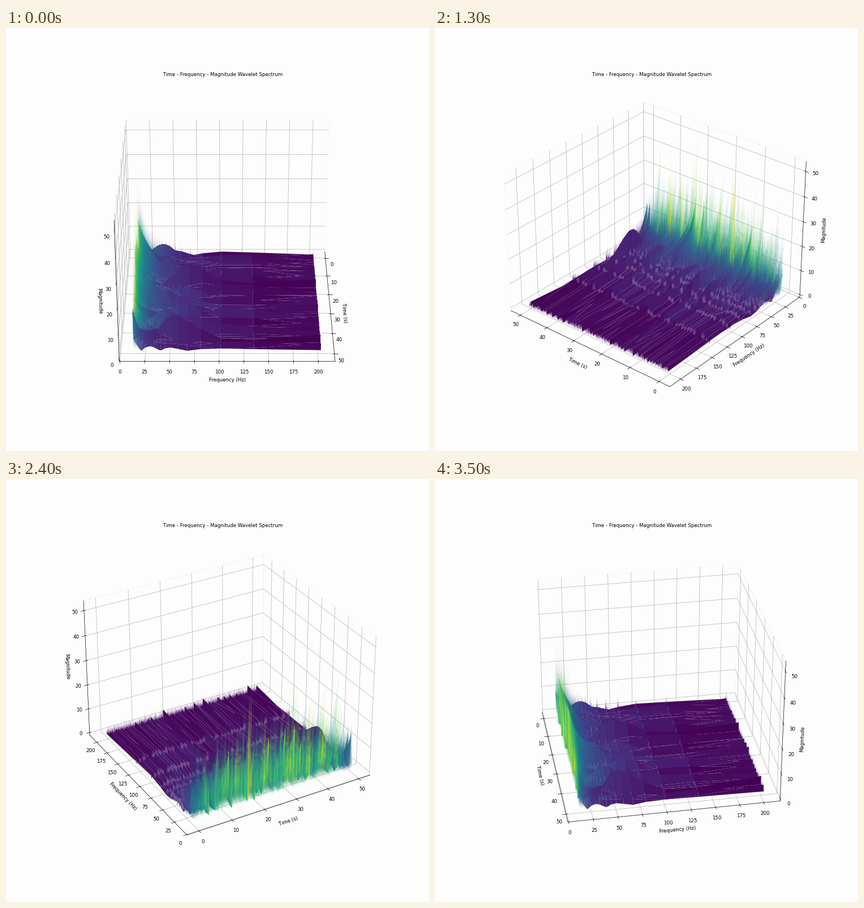
Write a matplotlib script that moves like this. It is 748 by 748 pixels and loops after 3.6 s.

```python
import numpy as np
import matplotlib.pyplot as plt
from matplotlib.animation import FuncAnimation

SIZE = 748
FRAMES = 36
FS = 250            # sampling rate, Hz
DURATION = 50       # seconds
STEP = 3            # keep every third sample
PEAK = 52.8
BG = "#fdfdfd"

rng = np.random.default_rng(12)


def wavelet_magnitude(freqs):
    """Absolute wavelet coefficients of a noise signal, one row per frequency."""
    n = FS * DURATION
    nu = np.fft.rfftfreq(n, 1 / FS)
    noise = np.fft.rfft(rng.standard_normal(n))
    t = np.arange(n) / FS

    # slow loudness changes, felt only at low frequency
    loud = np.interp(t, [0, 3, 8, 14, 18, 27, 35, 42, 46, 50],
                     [0.65, 0.85, 1.0, 1.05, 1.05, 1.0, 1.05, 0.95, 0.8, 0.6])

    def bell(center, width):
        gap = (nu - center + FS / 2) % FS - FS / 2
        return np.exp(-0.5 * (gap / width) ** 2)

    rows = []
    for f in freqs:
        low = 13 / f
        width = 0.196 * f + 14 * low
        row = np.fft.irfft(noise * (bell(f, width) + bell(-f, width)), n)
        sigma = 1.8 * (203 / f) ** 0.5 + 7 * low ** 2.5
        rows.append(np.abs(row / row.std()) * sigma * loud ** min(1, 2 * low))
    mag = np.array(rows)[:, ::STEP]
    return t[::STEP], mag * PEAK / mag.max()


def padded(lo, hi, margin):
    pad = (hi - lo) * margin
    lo, hi = lo - pad, hi + pad
    edge = (hi - lo) / 48
    return lo - edge, hi + edge


freqs = 0.8125 * FS / np.arange(1, 16, 0.5)
times, mag = wavelet_magnitude(freqs)
T, F = np.meshgrid(times, freqs)

fig = plt.figure(figsize=(12, 12), dpi=SIZE / 12, facecolor=BG)
ax = fig.add_subplot(111, projection="3d", facecolor=BG)
ax.plot_surface(T, F, mag, cmap="viridis", linewidth=0,
                rstride=1, cstride=-(-len(times) // 50))

ax.set_xlim(*padded(0, DURATION, 0.05))
ax.set_ylim(*padded(freqs.min(), freqs.max(), 0.05))
ax.set_zlim(*padded(0, PEAK, 0))
ax.set_xticks(range(0, 51, 10))
ax.set_yticks(range(0, 201, 25))
ax.set_zticks(range(0, 51, 10))
for axis in (ax.xaxis, ax.yaxis, ax.zaxis):
    axis.pane.set_fill(False)

ax.set_xlabel("Time (s)")
ax.set_ylabel("Frequency (Hz)")
ax.set_zlabel("Magnitude")
ax.set_title("Time - Frequency - Magnitude Wavelet Spectrum", fontsize=10)


def update(i):
    # wrap to (-180, 180]; the tiny shrink settles which wall shows edge-on
    azim = 180 - (180 - i * 360 / FRAMES) % 360
    ax.view_init(elev=30, azim=azim * (1 - 1e-6))
    return ()


anim = FuncAnimation(fig, update, frames=FRAMES, interval=100,
                     repeat=True, repeat_delay=0, blit=False)
plt.show()
```
